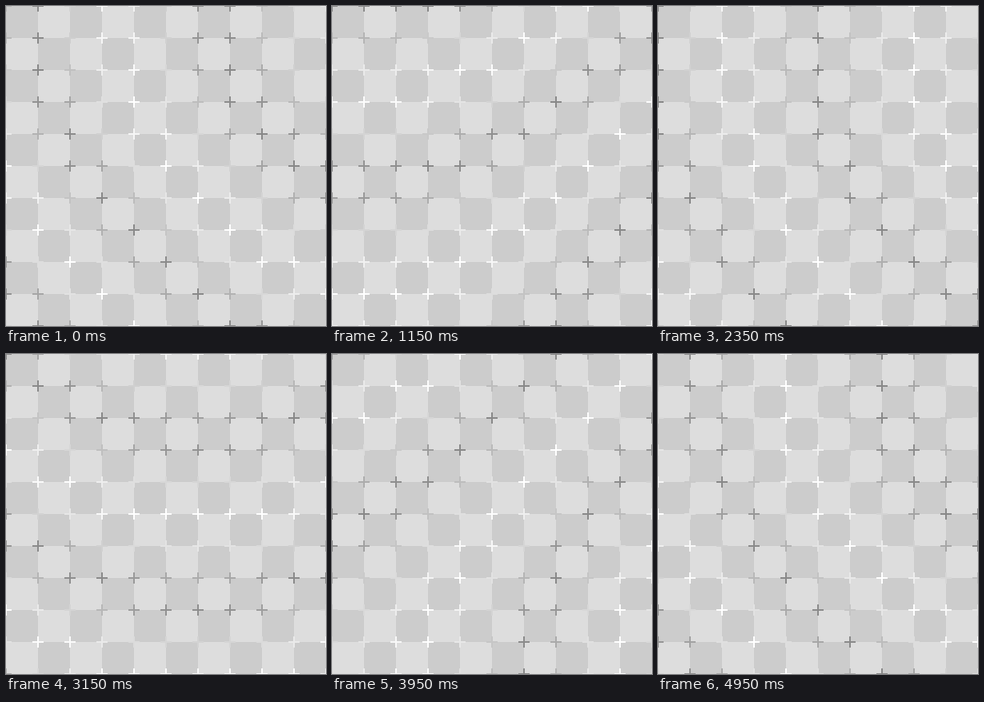
Recreate the animation shown at these times as an HTML page. Size 400 by 400 pixels, loop 5 s.

```html
<!DOCTYPE html>
<html lang="en">
<head>
<meta charset="utf-8">
<title>Checkerboard with rippling crosses</title>
<style>
  html, body { margin: 0; width: 100%; height: 100%; overflow: hidden; background: #ddd; }
  svg { display: block; width: 100vw; height: 100vh; }
</style>
</head>
<body>
<svg id="stage" viewBox="0 0 400 400" shape-rendering="crispEdges">
  <rect width="400" height="400" fill="#ddd"/>
</svg>
<script>
const NS = "http://www.w3.org/2000/svg";
const stage = document.getElementById("stage");
const CELL = 40, COUNT = 10, ARM = 7;
const LOOP = 5000, STEP = 50;
const LAG = Math.PI * 2 / 50; // delay per cell
const DEPTH = 10;
const DARK = 136, MID = 212, LIGHT = 255;

function add(name, attrs) {
  const el = document.createElementNS(NS, name);
  for (const key in attrs) el.setAttribute(key, attrs[key]);
  return stage.appendChild(el);
}

let board = "";
for (let j = 0; j < COUNT; j++) {
  for (let i = j % 2; i < COUNT; i += 2) {
    board += `M${i * CELL} ${j * CELL}h${CELL}v${CELL}h${-CELL}z`;
  }
}
add("path", { d: board, fill: "#ccc" });

const crosses = [];
for (let j = 0; j <= COUNT; j++) {
  for (let i = 0; i <= COUNT; i++) {
    const x = i * CELL, y = j * CELL;
    const d = `M${x - ARM} ${y}h${2 * ARM}M${x} ${y - ARM}v${2 * ARM}`;
    crosses.push({ i, j, el: add("path", { d, fill: "none", "stroke-width": 2 }) });
  }
}

function shade(wave) {
  const amount = Math.pow(Math.abs(wave), 1.4);
  const end = wave < 0 ? DARK : LIGHT;
  const v = Math.round(MID + (end - MID) * amount);
  return `rgb(${v},${v},${v})`;
}

function draw(ms) {
  const turn = Math.floor((ms % LOOP) / STEP) * STEP / LOOP * Math.PI * 2;
  for (const { i, j, el } of crosses) {
    const phase = DEPTH * (Math.sin(turn + i * LAG) + Math.cos(turn + j * LAG));
    el.setAttribute("stroke", shade(Math.sin(phase)));
  }
}

const start = performance.now();
function tick() {
  draw(performance.now() - start);
  requestAnimationFrame(tick);
}
draw(0);
requestAnimationFrame(tick);
</script>
</body>
</html>
```
